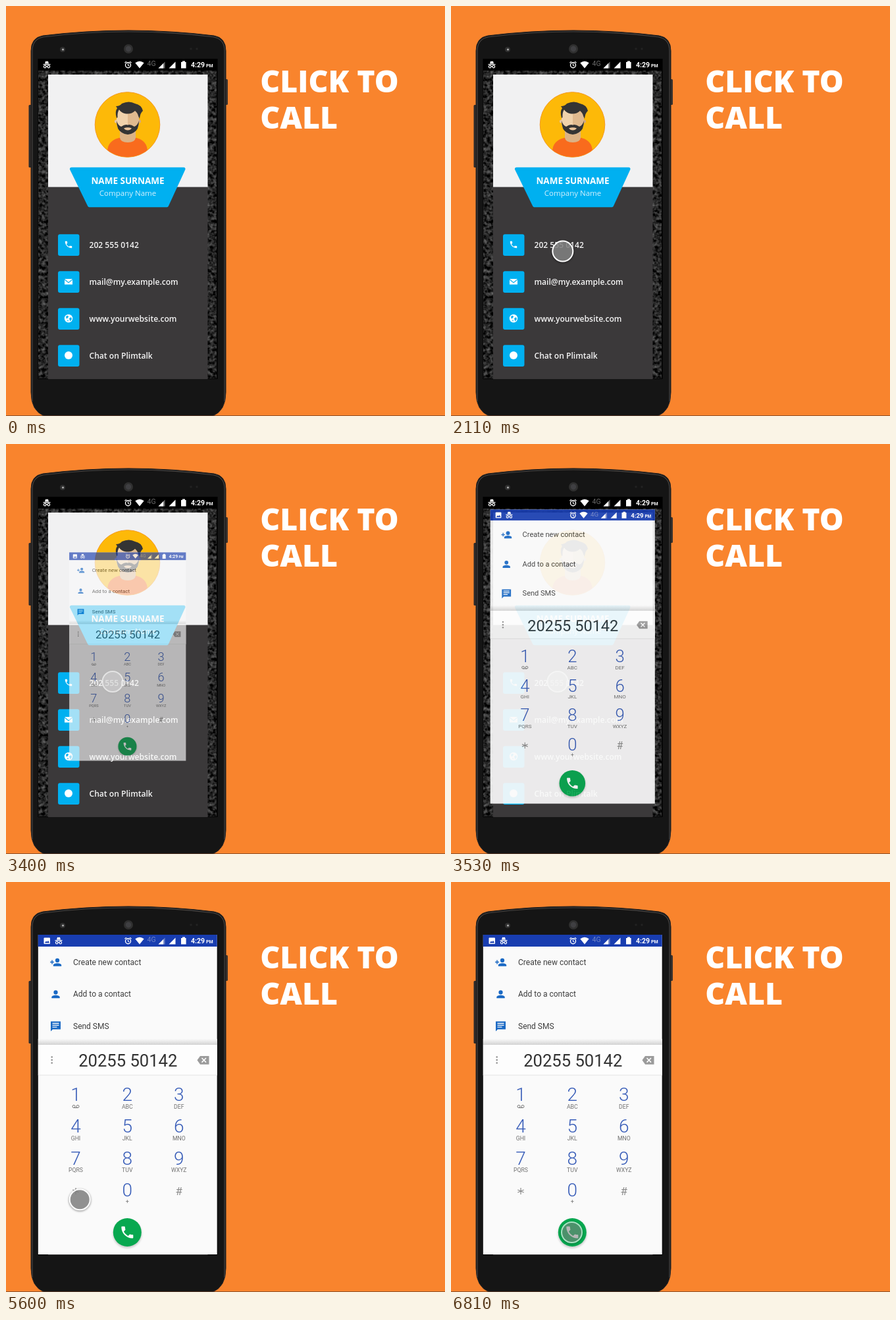
Recreate the animation shown at these times as an HTML page. Size 667 by 622 pixels, loop 7140 ms.

```html
<!DOCTYPE html>
<html lang="en">
<head>
<meta charset="utf-8">
<title>Click to call</title>
<style>
html, body { margin: 0; width: 100%; height: 100%; overflow: hidden; background: #f9842d; }
svg { display: block; width: 667px; height: 622px; }
text { font-family: "Open Sans", "Noto Sans", sans-serif; }
.roboto text { font-family: Roboto, "Liberation Sans", sans-serif; }
</style>
</head>
<body>
<svg id="stage" viewBox="0 0 667 622" xmlns="http://www.w3.org/2000/svg"></svg>
<script>
const LOOP = 7140;
const BLUE = '#00b0f0', CARD = '#3b393a', ICON = '#1a69c4';

const rect = (x, y, w, h, fill, extra = '') =>
  `<rect x="${x}" y="${y}" width="${w}" height="${h}" fill="${fill}" ${extra}/>`;
const circle = (x, y, r, fill, extra = '') =>
  `<circle cx="${x}" cy="${y}" r="${r}" fill="${fill}" ${extra}/>`;
const path = (d, fill, extra = '') => `<path d="${d}" fill="${fill}" ${extra}/>`;
const line = (d, stroke, width, extra = '') =>
  path(d, 'none', `stroke="${stroke}" stroke-width="${width}" ${extra}`);
const text = (x, y, size, fill, str, weight = 400, anchor = 'start') =>
  `<text x="${x}" y="${y}" font-size="${size}" fill="${fill}" font-weight="${weight}" text-anchor="${anchor}">${str}</text>`;
const at = (x, y, scale, body) => `<g transform="translate(${x} ${y}) scale(${scale})">${body}</g>`;

// Icons, drawn around their own centre
const handset = (x, y, scale) => at(x, y, scale, path(
  'M-5.4-1.2C-4 1.6-1.6 4 1.2 5.4l2.2-2.2q.5-.4 1-.2 1.7.5 3.6.5 1 0 1 1V8q0 1-1 1C-1.4 9-9 1.4-9-8q0-1 1-1h3.5q1 0 1 1 0 1.9.6 3.6.1.5-.3 1z', '#fff'));
const person = (x, y, scale) => at(x, y, scale,
  circle(0, -3.2, 3.3, ICON) + path('M-6.5 6V4.3C-6.5.2 6.5.2 6.5 4.3V6z', ICON));
const hatGlasses = x => at(x, 89, 1,
  path('M-3-1.5-2-5Q-1.6-5.6 0-5 1.6-5.6 2-5L3-1.5z', '#fff') + rect(-5.5, -1, 11, 1.2, '#fff') +
  circle(-2.8, 3, 1.8, 'none', 'stroke="#fff" stroke-width="1.2"') +
  circle(2.8, 3, 1.8, 'none', 'stroke="#fff" stroke-width="1.2"') + line('M-1 2.6h2', '#fff', 1));

function statusIcons(dim) {
  return circle(185.5, 89.7, 4, 'none', 'stroke="#fff" stroke-width="1.4"') +
    line('M185.5 87.3v2.7l1.8 1M180.4 86.2l2.6-2M190.6 86.2l-2.6-2', '#fff', 1.1) +
    path('M196.3 86.3Q203 81 209.7 86.3L203 94.5z', '#fff') +
    text(214.5, 91, 10.5, dim, '4G') +
    path('M231.5 94.5h10V84.5z', dim) + path('M231.5 94.5h7.6V87z', '#fff') +
    path('M247.5 94.5h10V84.5z', '#fff') +
    path('M266 85h2v-1.4h4V85h1.6v9.6H266z', '#fff') +
    text(281, 93.3, 10.5, '#fff', '4:29', 700) + text(304, 93.3, 7, '#fff', 'PM', 700);
}

function phoneBody() {
  return rect(34.5, 150, 5, 95, '#2e2b2a', 'rx="1.5"') + rect(332, 111, 5, 39, '#3a332f', 'rx="1.5"') +
    path('M38 68Q38 48 56 45 120 37.2 186 37 252 37.2 316 45 334 48 334 68V586Q334 614 314 622H58Q38 614 38 586Z',
      '#151515', 'stroke="#2b2725" stroke-width="1"') +
    line('M40 600V68Q40 50 57 47 120 39 186 39 252 39 315 47 332 50 332 68V600', '#484543', 1.2) +
    circle(86, 66, 4, '#303030') + circle(86.5, 66, 1.6, '#aaa') +
    circle(186, 65, 7, '#303030') + circle(186, 65, 4.2, '#3f3f42') +
    circle(281, 65, 1.7, '#222') + circle(290, 65, 1.7, '#222') +
    rect(48.5, 80, 273, 486, '#000');
}

function avatar() {
  return circle(184.5, 180, 49.3, '#fdb908', 'stroke="#f49a23" stroke-width="1"') +
    `<g clip-path="url(#disc)">` +
    path('M154 232V220Q155 204 172 200H198Q214 204 215 220V232z', '#f96b1d') +
    path('M173 188H197V200Q196 207 185 207 174 207 173 200z', '#dcb285') +
    `</g>` +
    circle(167.5, 175, 2.6, '#e9c49c') + circle(202.5, 175, 2.6, '#d5aa7d') +
    path('M168 158H185V193Q169 192 168 177z', '#f0d2ab') +
    path('M185 158H202V177Q201 192 185 193z', '#e0ba8f') +
    path('M168 174Q170 181 175 183 181 179 185 180.5 189 179 195 183 200 181 202 174 202 188 194 192 185 198 176 192 168 188 168 174z', '#343434') +
    path('M179 185.5Q185 183 191 185.5 189 188.500 185 188.500 181 188.500 179 185.5z', '#e8c39a') +
    path('M168 170Q165 160 169 155L167 152Q173 152 176 148 187 143 196 148 206 150 208 159 204 162 203 171L201 167Q200 162 196 159 190 165 180 163 174 161 172 157 169 161 169.500 169z', '#343434');
}

function cardRow(i, label, icon) {
  const y = 362.5 + i * 56;
  return rect(79, y - 16.3, 32.5, 32.7, BLUE, 'rx="3"') + at(95, y - .5, 1, icon) +
    text(126.5, y + 4, 12.1, '#f5f5f5', label, 600);
}

function cardScreen() {
  const mail = path('M-6-4H6L0 1z', '#fff') + path('M-6-2.5 0 2.5 6-2.5V4.5H-6z', '#fff');
  const globe = circle(0, 0, 6.2, '#fff') +
    path('M-4-3-1-4.5 0-2.5-2 0-3 .5zM1 0 4-2 5 1 2.5 4.5zM-2 2 0 3-1 5z', BLUE);
  return rect(49.5, 98, 270.5, 466.5, '#222', 'filter="url(#grain)"') +
    rect(64, 104, 242.5, 171, '#f1f1f2') + rect(64, 274.6, 242.5, 291.4, CARD) + avatar() +
    path('M99.5 247.3H270L244.5 302.7H126.5z', BLUE, `stroke="${BLUE}" stroke-width="5" stroke-linejoin="round"`) +
    text(185, 269.5, 13.5, '#fff', 'NAME SURNAME', 700, 'middle') +
    text(185, 287.7, 11.5, '#d5f1fd', 'Company Name', 400, 'middle') +
    cardRow(0, '202 555 0142', handset(0, 0, .58)) +
    cardRow(1, 'mail@my.example.com', mail) +
    cardRow(2, 'www.yourwebsite.com', globe) +
    cardRow(3, 'Chat on Plimtalk', circle(0, 0, 6, '#fff')) +
    `<g class="roboto">${hatGlasses(62)}${statusIcons('#6a6a6a')}</g>`;
}

function keypad() {
  const letters = ['', 'ABC', 'DEF', 'GHI', 'JKL', 'MNO', 'PQRS', 'TUV', 'WXYZ'];
  const cols = [106, 184.3, 262.8];
  const keys = letters.map((label, i) => {
    const x = cols[i % 3], y = 332 + Math.floor(i / 3) * 48.3;
    return text(x, y, 28, '#375cb8', i + 1, 300, 'middle') +
      text(x, y + 11.5, 8.7, '#707070', label, 400, 'middle');
  }).join('');
  const tape = [103, 109].map(x => circle(x, 340.5, 2, 'none', 'stroke="#777" stroke-width="1"')).join('') +
    line('M103 342.5h6', '#777', 1);
  const star = line('M0-5V5M-4.7-2 4.7 2M4.7-2-4.7 2', '#8a8a8a', 1.2);
  return keys + tape + at(cols[0], 469, 1, star) +
    text(cols[1], 477, 28, '#375cb8', 0, 300, 'middle') + text(cols[1], 488, 9, '#707070', '+', 400, 'middle') +
    text(cols[2], 475, 17, '#8a8a8a', '#', 400, 'middle');
}

function dialer() {
  const ink = '#3c3c3c', left = 48.8, width = 271.9;
  const message = path('M-7.5-7H7.5V5H-4.5L-7.5 8z', ICON) + line('M-5-4H5M-5-1.2H5M-5 1.6H2', '#fafafa', 1.3);
  const picture = rect(57.5, 84.5, 9.5, 9.5, '#fff', 'rx="1"') + path('M58.8 92.5 61 89.5 62.5 91 64 88.8 66 92.5z', '#183db0');
  return rect(left, 80, width, 485, '#fafafa') + rect(left, 80, width, 18, '#183db0') +
    picture + hatGlasses(80) + statusIcons('#7184c6') +
    person(78, 122, .95) + line('M67 121.5h6M70 118.5v6', ICON, 1.5) + person(75.5, 170.5, .95) + at(75.5, 218.5, 1, message) +
    text(102, 125.7, 12, ink, 'Create new contact') +
    text(102, 174.2, 12, ink, 'Add to a contact') +
    text(102, 222.5, 12, ink, 'Send SMS') +
    rect(left, 238, width, 9, 'url(#fold)') + rect(left, 247, width, 46, '#fdfdfd') +
    rect(left, 292.5, width, 1, '#e6e6e6') +
    [265.5, 270, 274.5].map(y => circle(69.7, y, 1.3, '#909090')).join('') +
    text(185.3, 280.3, 25.6, '#333', '20255 50142', 400, 'middle') +
    path('M290.5 270.3 295 264H308.5V276.7H295z', '#9b9b9b') +
    line('M297.5 267 304 273.6M304 267 297.5 273.6', '#fff', 1.5) +
    keypad() +
    circle(184.3, 533.5, 22, '#000', 'opacity=".18" filter="url(#soft)"') +
    circle(184.3, 531.5, 21.5, '#08a850') + handset(184.3, 531.5, 1);
}

const pointer = id => `<g id="${id}">` +
  circle(0, 1, 17, '#000', 'opacity=".35" filter="url(#soft)"') +
  circle(0, 0, 15.5, '#8c8c8c', 'fill-opacity=".8" stroke="#fff" stroke-width="2"') + '</g>';

document.getElementById('stage').innerHTML = `<defs>
  <clipPath id="disc"><circle cx="184.5" cy="180" r="49"/></clipPath>
  <linearGradient id="fold" x2="0" y2="1"><stop stop-color="#fafafa"/><stop offset="1" stop-color="#d2d2d2"/></linearGradient>
  <filter id="soft" x="-30%" y="-30%" width="160%" height="160%"><feGaussianBlur stdDeviation="1.5"/></filter>
  <filter id="grain" x="0" y="0" width="1" height="1" color-interpolation-filters="sRGB">
    <feTurbulence type="fractalNoise" baseFrequency=".2" numOctaves="2" seed="7"/>
    <feColorMatrix values=".7 0 0 0 -.2 .7 0 0 0 -.2 .7 0 0 0 -.2 0 0 0 0 1"/>
  </filter></defs>` +
  rect(0, 0, 667, 622, '#f9842d') +
  phoneBody() + cardScreen() + pointer('cardPointer') +
  `<g id="dialer" class="roboto">${dialer()}</g>` + pointer('dialPointer') +
  text(386.3, 131, 46.3, '#fff', 'CLICK TO', 800) + text(386.3, 186.3, 46.3, '#fff', 'CALL', 800) +
  rect(0, 621, 667, 1, '#6b4630', 'opacity=".75"');

const progress = (t, from, to) => Math.min(1, Math.max(0, (t - from) / (to - from)));
const easeInOut = p => p < .5 ? 2 * p * p : 1 - 2 * (1 - p) * (1 - p);
const mix = (a, b, p) => a + (b - a) * p;

function place(id, t, move) {
  const p = easeInOut(progress(t, move.start, move.end));
  const el = document.getElementById(id);
  el.setAttribute('transform', `translate(${mix(move.from[0], move.to[0], p)} ${mix(move.from[1], move.to[1], p)})`);
  el.setAttribute('opacity', t < move.show ? 0 : mix(1, .65, progress(t, ...move.press)));
}

function render(time) {
  const t = 965 + Math.floor((time - 965) / 67) * 67;
  place('cardPointer', t, { show: 960, start: 930, end: 2375, from: [273, 525], to: [162, 360.5], press: [2380, 2510] });
  place('dialPointer', t, { show: 3700, start: 5180, end: 6640, from: [99, 472.5], to: [183.5, 531.5], press: [6620, 6790] });
  const grow = progress(t, 3051, 3551);
  const screen = document.getElementById('dialer');
  screen.setAttribute('opacity', grow);
  screen.setAttribute('transform', `translate(184.7 322.5) scale(${grow}) translate(-184.7 -322.5)`);
}

const begin = performance.now();
function tick() {
  render((performance.now() - begin) % LOOP);
  requestAnimationFrame(tick);
}
tick();
</script>
</body>
</html>
```
